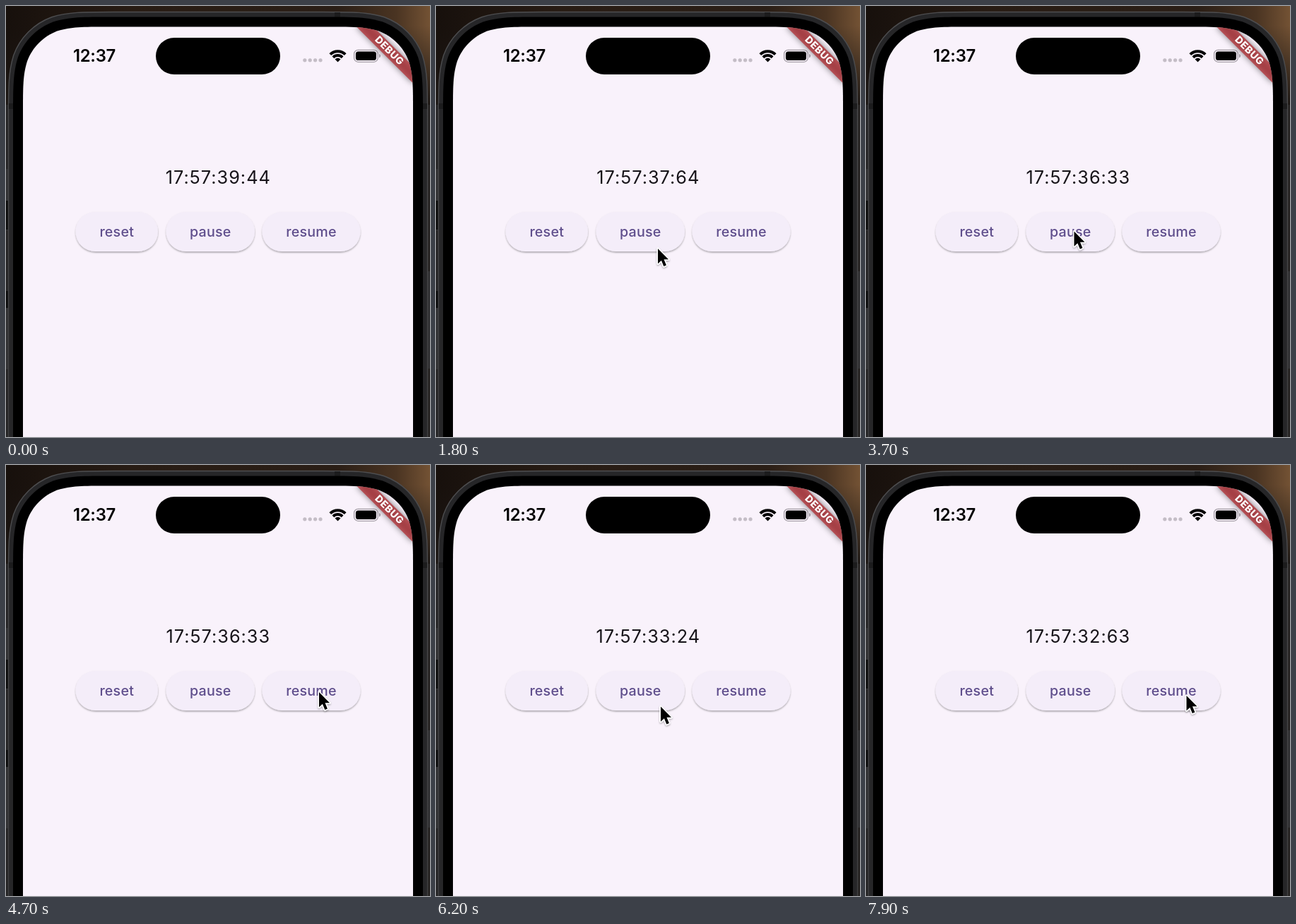
An HTML page for the animation above (8 s loop, 600 by 611 pixels).

```html
<!DOCTYPE html>
<html lang="en">
<head>
<meta charset="utf-8">
<title>Countdown</title>
<style>
  html, body { margin: 0; width: 100%; height: 100%; overflow: hidden; background: #17110e; }
  svg { display: block; width: 600px; height: 611px; }
  text { font-family: Inter, Roboto, sans-serif; text-anchor: middle; }
  .clock { font-size: 23.9px; font-weight: 600; letter-spacing: -.3px; }
  .timer { font-size: 25.3px; letter-spacing: 1px; fill: #171419; }
  .label { font-size: 19.7px; font-weight: 500; letter-spacing: .2px; fill: #5f4e8c; }
  .debug { font-size: 14px; font-weight: 800; letter-spacing: .5px; fill: #fff; }
</style>
</head>
<body>
<svg viewBox="0 0 600 611">
  <defs>
    <linearGradient id="room">
      <stop offset="0" stop-color="#17100c"/>
      <stop offset=".3" stop-color="#281c14"/>
      <stop offset=".78" stop-color="#2a1e16"/>
      <stop offset=".92" stop-color="#4a3422"/>
      <stop offset="1" stop-color="#735234"/>
    </linearGradient>
    <linearGradient id="dusk" x2="0" y2="1">
      <stop offset=".2" stop-color="#1c1714" stop-opacity="0"/>
      <stop offset="1" stop-color="#1c1714"/>
    </linearGradient>
    <linearGradient id="side" x2="0" y2="1">
      <stop offset="0" stop-color="#4d4d4f"/>
      <stop offset="1" stop-color="#3d3d3f"/>
    </linearGradient>
    <filter id="lift" x="-10%" y="-20%" width="120%" height="150%">
      <feDropShadow dx="0" dy="1.6" stdDeviation="1.3" flood-color="#000" flood-opacity=".32"/>
    </filter>
    <filter id="soft" x="-20%" y="-150%" width="140%" height="400%">
      <feGaussianBlur stdDeviation="4.6"/>
    </filter>
    <filter id="drop" x="-50%" y="-30%" width="200%" height="170%">
      <feDropShadow dx="0" dy="1.3" stdDeviation="1.2" flood-opacity=".35"/>
    </filter>
    <clipPath id="screen"><path class="shell" data-box="24 29.5 552 78"/></clipPath>
  </defs>

  <!-- surroundings and phone body -->
  <rect width="600" height="611" fill="url(#room)"/>
  <rect width="600" height="140" fill="url(#dusk)"/>
  <rect y="140" width="4" height="471" fill="#252425"/>
  <rect x="596" y="140" width="4" height="471" fill="#262322"/>
  <g fill="#313133">
    <rect y="231" width="3" height="87"/>
    <rect y="405" width="3" height="110"/>
    <rect x="597" y="376" width="3" height="138"/>
  </g>
  <g fill="#0c0c0c">
    <rect y="276" width="3" height="41"/>
    <rect y="404" width="3" height="24"/>
  </g>
  <path class="shell" data-box="3.5 8.5 593 97" fill="#262628" stroke="url(#side)" stroke-width="1.4"/>
  <g fill="#1c1c1d">
    <rect x="4" y="138" width="7" height="8"/>
    <rect x="589" y="138" width="7" height="8"/>
    <rect x="465" y="9" width="8" height="8"/>
  </g>
  <path class="shell" data-box="10 15.5 580 91"/>
  <path class="shell" data-box="24 29.5 552 78" fill="#f9f2fb"/>

  <!-- status bar -->
  <rect x="212" y="45" width="176" height="52" rx="26"/>
  <text class="clock" x="125" y="79.2">12:37</text>
  <g fill="#c4bdc6">
    <circle cx="422.8" cy="76.8" r="2.6"/>
    <circle cx="430.2" cy="76.8" r="2.6"/>
    <circle cx="437.6" cy="76.8" r="2.6"/>
    <circle cx="445" cy="76.8" r="2.6"/>
  </g>
  <g transform="translate(469.5 79.4)">
    <g fill="none" stroke="#000" stroke-width="3.9">
      <path d="M-10.7 -10.7a15.1 15.1 0 0 1 21.4 0"/>
      <path d="M-6.6 -6.6a9.3 9.3 0 0 1 13.2 0"/>
    </g>
    <path d="M0 0L-4 -4a5.6 5.6 0 0 1 8 0z"/>
  </g>
  <rect x="492.6" y="62.3" width="33.6" height="17" rx="5.6" fill="none" stroke="#a29ca4" stroke-width="1.3"/>
  <rect x="494.9" y="64.6" width="29" height="12.4" rx="3.6"/>
  <path d="M528 68v5.6q2-.8 2-2.8t-2-2.8z" fill="#a29ca4"/>

  <!-- corner ribbon -->
  <g clip-path="url(#screen)">
    <g transform="translate(576 30) rotate(45)">
      <rect x="-56.2" y="39.3" width="112.4" height="16.9" fill-opacity=".5" filter="url(#soft)"/>
      <rect x="-56.2" y="39.3" width="112.4" height="16.9" fill="#b4262b" fill-opacity=".7"/>
      <text class="debug" x="0" y="51.9">DEBUG</text>
    </g>
  </g>

  <text class="timer" id="timer" x="300.3" y="251.8"></text>
  <g id="buttons"></g>

  <g id="cursor" filter="url(#drop)">
    <path d="M0 0V21.2L4.9 16.7L8.3 25L11.9 23.4L8.5 15.3H15Z" stroke="#fff" stroke-width="3.2" paint-order="stroke" stroke-linejoin="round"/>
  </g>
</svg>
<script>
const LOOP = 8000, STEP = 100, START = 3944;
const $ = id => document.getElementById(id);

// Phone outlines have continuous corners and run on below the stage.
const corner = [[0, 1.529], [0, 1.088], [0, .868], [.075, .631], [.169, .373],
  [.373, .169], [.631, .075], [.868, 0], [1.088, 0], [1.529, 0]];

function shell(x, y, w, r) {
  const left = corner.map(([u, v]) => [x + u * r, y + v * r]);
  const right = left.map(([u, v]) => [2 * x + w - u, v]).reverse();
  const curve = ([first, ...rest]) => `${first}C${rest.join(" ")}`;
  return `M${x},720L${curve(left)}L${curve(right)}V720Z`;
}

for (const el of document.querySelectorAll(".shell"))
  el.setAttribute("d", shell(...el.dataset.box.split(" ").map(Number)));

// label, left, width
const buttons = [["reset", 98.5, 116.5], ["pause", 226.5, 125.5], ["resume", 362.5, 139]];
$("buttons").innerHTML = buttons.map(([label, x, w]) =>
  `<rect x="${x}" y="292" width="${w}" height="56" rx="28" fill="#f4edf9" filter="url(#lift)"/>
   <text class="label" x="${x + w / 2}" y="327.4">${label}</text>`).join("");

// time, x, y of the pointer tip
const path = [
  [1000, 497, 506], [1100, 489, 462], [1400, 400, 388], [1800, 314, 344],
  [2200, 296, 328], [2600, 295.5, 327], [3100, 294.5, 319.5], [3900, 294.5, 319.5],
  [4200, 368, 327], [4500, 440, 322], [4800, 444.5, 322], [5500, 444.5, 322],
  [5800, 390, 338], [6000, 343, 346], [6200, 318, 342.5], [6300, 309, 337],
  [6600, 298, 327], [7000, 298, 326], [7300, 365, 327], [7600, 447, 326], [7900, 453.5, 327]
];

// [from, to]: the readout stands still while the count goes on
const pauses = [[3110, 4800], [6810, LOOP]];

function pointAt(t) {
  const i = path.findIndex(p => p[0] >= t);
  if (i < 1) return path[i < 0 ? path.length - 1 : 0].slice(1);
  const [a, b] = [path[i - 1], path[i]];
  const k = (t - a[0]) / (b[0] - a[0]);
  return [1, 2].map(n => a[n] + (b[n] - a[n]) * k);
}

function readout(t) {
  const pause = pauses.find(([from, to]) => t >= from && t < to);
  const left = START - Math.round((pause ? pause[0] : t) / 10);
  const pad = n => String(n).padStart(2, "0");
  return `17:57:${pad(Math.floor(left / 100))}:${pad(left % 100)}`;
}

function draw(now) {
  const t = Math.floor((now % LOOP) / STEP) * STEP;
  $("timer").textContent = readout(t);
  const [x, y] = pointAt(t);
  $("cursor").setAttribute("transform", `translate(${x} ${y})`);
  $("cursor").setAttribute("visibility", t < path[0][0] ? "hidden" : "visible");
}

const begin = performance.now();
function tick() {
  draw(performance.now() - begin);
  requestAnimationFrame(tick);
}
tick();
</script>
</body>
</html>
```
